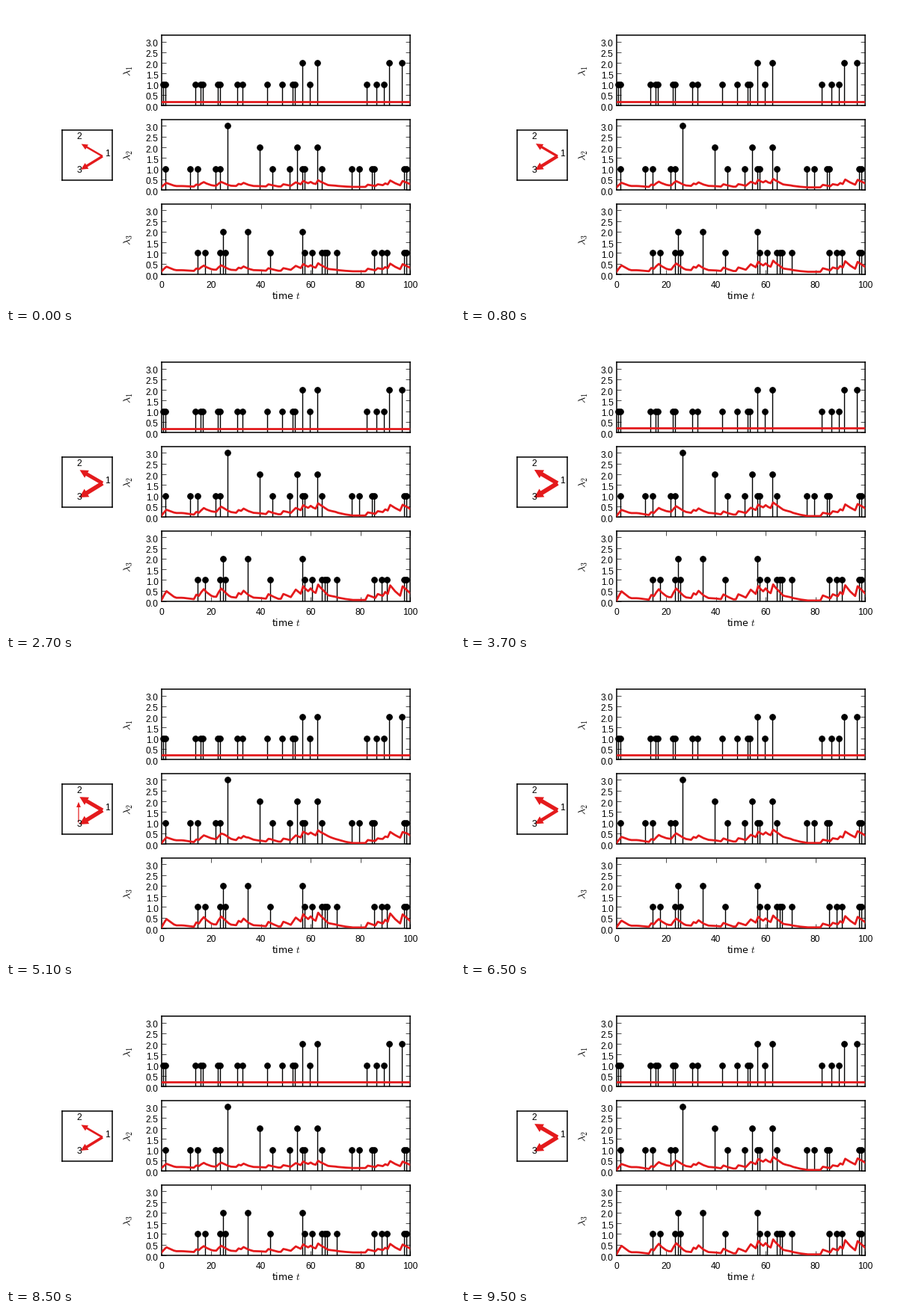
These frames come from a looping animation (600x400 px, 9.6 s). A matplotlib script:

```python
import numpy as np
import matplotlib.pyplot as plt
from matplotlib.animation import FuncAnimation
from matplotlib.patches import Polygon
from matplotlib.transforms import ScaledTranslation

W, H, DPI = 600, 400, 100
FRAMES, STEP_MS = 96, 100
PT = 72 / DPI  # points per pixel
RED = "#e41a1c"

plt.rcParams["font.family"] = "Liberation Sans"
plt.rcParams["mathtext.fontset"] = "cm"
plt.rcParams["axes.linewidth"] = 1.1


def count_events(single, double=(), triple=()):
    counts = np.zeros(101)
    counts[single] = 1
    counts[list(double)] = 2
    counts[list(triple)] = 3
    return counts


# Event bins of the three processes, with runs as slices
COUNTS = [
    count_events(np.r_[0:2, 13, 15:17, 22:24, 30, 32, 42, 48, 52:54, 59,
                       82, 86, 89], (56, 62, 91, 96)),
    count_events(np.r_[1, 11, 14, 21, 23, 44, 51, 56:58, 64, 76, 79, 84:86,
                       97:99], (39, 54, 62), (26,)),
    count_events(np.r_[14, 17, 23, 25, 43, 57, 60, 64:67, 70, 85, 88, 90,
                       97:99], (24, 34, 56)),
]

# Coupling strength from 1 to 2 and from 1 to 3, drifting between key points
STEPS = np.arange(FRAMES)
KEYS = [0, 17, 37, 51, 65, 85, 95]
STRENGTH2 = np.interp(STEPS, KEYS, [0, .5, 1, 1, .95, .05, .95])
STRENGTH3 = np.interp(STEPS, KEYS, [0, .9, 1, .9, .5, .15, .95])
JITTER = np.random.default_rng(4).normal(1, .03, (FRAMES, 4))
BACK_EDGE = range(48, 55)  # steps in which 3 also excites 2

# Impulse responses by lag: a short burst and a long plateau
LAG = np.arange(16)
FAST = np.interp(LAG, [0, 1, 5], [0, 1, 0])
SLOW = np.interp(LAG, [0, 1, 8, 15], [0, 1, 1, 0])


def mix(low, high, s):
    return low + (high - low) * s


def excite(source, kernel):
    return np.convolve(COUNTS[source], kernel)[:101]


def arrow_points(start, end, width):
    """Shaft of fixed length with a head that grows with the width."""
    start, end = np.array(start), np.array(end)
    u = (end - start) / np.hypot(*(end - start))
    n = np.array([-u[1], u[0]])
    half, head = width / 2, (4 + 1.5 * width) / 2
    tip = end + u * (6 + width)
    return [start + n * half, end + n * half, end + n * head, tip,
            end - n * head, end - n * half, start - n * half]


def pixel_axes(left, top, width, height):
    return fig.add_axes([left / W, 1 - (top + height) / H,
                         width / W, height / H])


fig = plt.figure(figsize=(W / DPI, H / DPI), dpi=DPI, facecolor="white")

# Network panel, in stage pixels
unit = 465 / 7
net_top = 199.6 - unit / 2
net = pixel_axes(75.4, net_top, unit, unit)
net.set(xlim=(75.4, 75.4 + unit), ylim=(net_top + unit, net_top),
        xticks=[], yticks=[])
for name, x, y in (("1", 135.8, 198), ("2", 97.5, 175.5), ("3", 97.5, 219.8)):
    net.text(x, y, name, size=12.3 * PT, ha="center", va="center", zorder=5)

EDGES = [((129, 201), (108, 188.8)),
         ((129, 201), (108, 213.9)),
         ((97, 217.5), (97, 197))]
arrows = [Polygon(arrow_points(*e, 1), closed=True, fc=RED, ec="none", zorder=3)
          for e in EDGES]
for arrow in arrows:
    net.add_patch(arrow)

# Rate panels
row_h = 320 / 3.4
times = np.arange(101)
label_drop = ScaledTranslation(0, -2 / DPI, fig.dpi_scale_trans)
lines = []
for k, counts in enumerate(COUNTS):
    top = 39 + k * 1.2 * row_h
    ax = pixel_axes(75 + 2 * unit, top, 5 * unit, row_h)
    ax.set(xlim=(0, 100), ylim=(0, 3.3), yticks=np.arange(0, 3.1, .5))
    ax.set_xticks(range(0, 101, 20) if k == 2 else [])
    ax.tick_params(direction="in", top=True, right=True, length=4, width=.5,
                   labelsize=12 * PT)
    ax.tick_params(axis="x", pad=6.6)
    ax.tick_params(axis="y", pad=3)
    for label in ax.get_yticklabels():
        label.set_transform(label.get_transform() + label_drop)
    bins = np.flatnonzero(counts)
    ax.vlines(bins + .6, 0, counts[bins], color="k", lw=1, zorder=2)
    ax.plot(bins + .6, counts[bins], "ko", ms=5.7, mew=.5, clip_on=False,
            zorder=4)
    lines += ax.plot(times, 0 * times, color=RED, lw=2, zorder=3)
    fig.text(163.5 / W, 1 - (top + 1 + row_h / 2) / H, rf"$\lambda_{k + 1}$",
             size=14 * PT, rotation=90, ha="center", va="center")
fig.text(374 / W, 1 - 391.5 / H, "time $t$", size=12.5 * PT, ha="center",
         va="baseline", family="DejaVu Sans")


def draw(i):
    s2, s3 = STRENGTH2[i], STRENGTH3[i]
    j1, j2, j3, j4 = JITTER[i]
    base = mix(.14, .04, s2) * j4
    rate1 = .2 * j1 + 0 * times
    rate2 = base + j2 * excite(0, .083 * FAST + mix(.02, .07, s2) * SLOW)
    rate3 = base + j3 * excite(0, mix(.09, .18, s3) * FAST
                               + mix(.025, .053, s3) * SLOW)
    back = i in BACK_EDGE
    if back:
        rate2 = rate2 + excite(2, .02 * FAST)
    for line, rate in zip(lines, (rate1, rate2, rate3)):
        line.set_ydata(rate)
    widths = mix(2.5, 5.5, s2) * j2, mix(3.2, 5.8, s3) * j3, 1.2
    for arrow, edge, width in zip(arrows, EDGES, widths):
        arrow.set_xy(arrow_points(*edge, width))
    arrows[2].set_visible(back)
    return lines + arrows


anim = FuncAnimation(fig, draw, frames=FRAMES, interval=STEP_MS, repeat=True,
                     repeat_delay=0)
plt.show()
```
